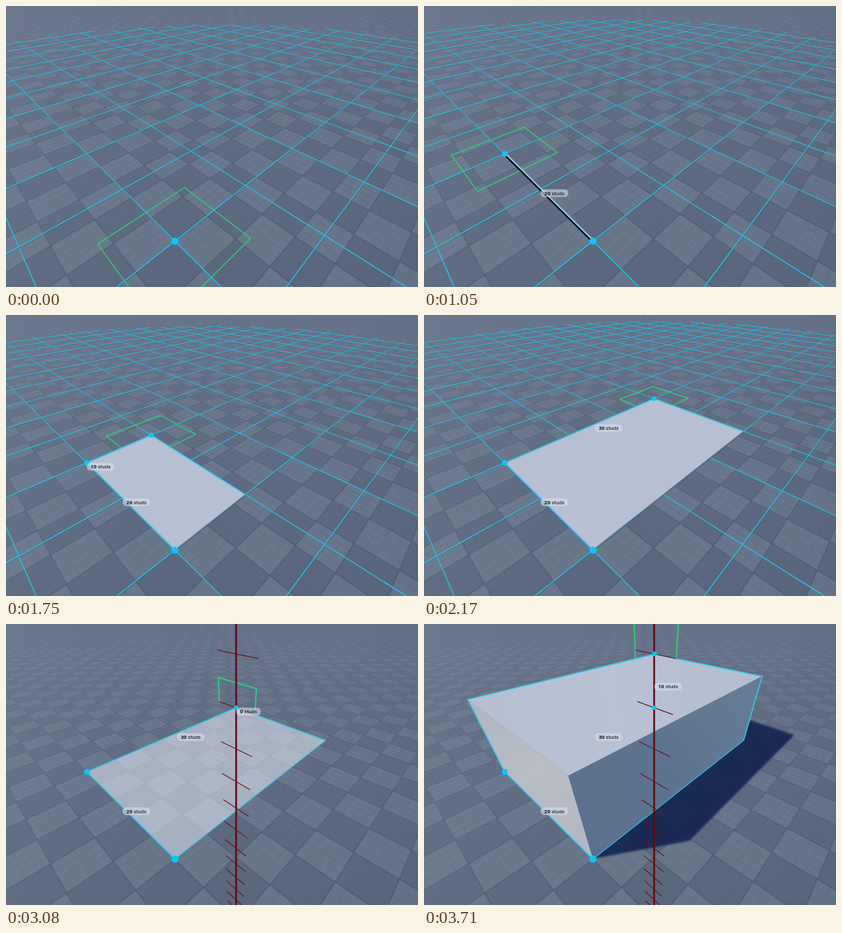
Animation, 640 px wide and 438 px high, one loop 3.92 s. Source, as an HTML page with a canvas:

```html
<!DOCTYPE html>
<html lang="en">
<head>
<meta charset="utf-8">
<title>Drawing a block on a grid</title>
<style>
  html, body { margin: 0; width: 100%; height: 100%; overflow: hidden; background: #5d6a7f; }
  canvas { display: block; width: 640px; height: 438px; }
</style>
</head>
<body>
<canvas id="stage" width="640" height="438"></canvas>
<script>
const W = 640, H = 438, LOOP = 3920;
const CYAN = '#30c2e2', EDGE = '#2fc8ee', DOT = '#0cc4fa', GREEN = '#2ccb78', PLANE = '#b7bfd3';
const GRID_RADIUS = 10.6;   // in units of 10 studs
const TILE = 0.4;

// Cursor cell over time: [ms, u, v]
const CURSOR = [[0, 0, 0], [280, 1, 0], [490, 2, 0], [1330, 2, 1], [1820, 2, 2], [2030, 2, 3]];
const EXTRUDE = 2590, ZERO_LABEL = 2800, RISE = 3220;

const ctx = document.getElementById('stage').getContext('2d');

// Perspective of a point: u and v lie on the ground, w is height
function project(u, v, w = 0) {
  const depth = 1 + 0.23156 * u + 0.25286 * v - 0.295 * w;
  return [
    (262 - 39.555 * u + 203.42 * v - 104.3 * w) / depth + 0.5,
    (366 - 14.741 * u - 15.899 * v - 199.6 * w) / depth + 0.5,
    depth
  ];
}

function trace(c, points, close) {
  c.beginPath();
  points.forEach(([x, y]) => c.lineTo(x, y));
  if (close) c.closePath();
}

function fill(c, points, style) {
  trace(c, points, true);
  c.fillStyle = style;
  c.fill();
}

function stroke(c, points, style, width, close = false) {
  trace(c, points, close);
  c.strokeStyle = style;
  c.lineWidth = width;
  c.stroke();
}

function shift([x, y], dx, dy) {
  return [x + dx, y + dy];
}

function gradient(c, x0, y0, x1, y1, ...stops) {
  const g = c.createLinearGradient(x0, y0, x1, y1);
  stops.forEach((color, i) => g.addColorStop(i / (stops.length - 1), color));
  return g;
}

function drawTile(c, i, j) {
  const u = i * TILE, v = j * TILE;
  const [x, y, depth] = project(u + TILE / 2, v + TILE / 2);
  if (depth < 0.6 || depth > 7.4 || x < -120 || x > W + 120 || y > H + 100) return;
  const fade = 1 / (1 + (depth / 4.5) ** 2);
  const corners = [project(u, v), project(u + TILE, v),
                   project(u + TILE, v + TILE), project(u, v + TILE)];
  const light = (i + j) & 1;
  if (light) fill(c, corners, `rgba(125,139,158,${0.4 * fade})`);
  stroke(c, corners, `rgba(62,75,96,${0.2 * fade})`, 2 / depth, true);
  if (depth > 3.2) return;
  const ink = `rgba(58,71,92,${(light ? 0.3 : 0.16) * (1 - depth / 3.4)})`;
  for (let k = 1; k < 4; k++) {
    const s = k * TILE / 4;
    stroke(c, [project(u + s, v), project(u + s, v + TILE)], ink, 0.9);
    stroke(c, [project(u, v + s), project(u + TILE, v + s)], ink, 0.9);
  }
}

function makeGround() {
  const canvas = document.createElement('canvas');
  canvas.width = W;
  canvas.height = H;
  const c = canvas.getContext('2d');
  c.fillStyle = gradient(c, 0, 0, 0, H, '#69758b', '#616e83', '#5d6a7f', '#5a677c');
  c.fillRect(0, 0, W, H);
  for (let i = -8; i < 58; i++) for (let j = -6; j < 54; j++) drawTile(c, i, j);
  c.fillStyle = gradient(c, 0, 0, W, 0, 'rgba(150,160,178,.12)', 'rgba(110,125,148,0)', 'rgba(50,65,92,.06)');
  c.fillRect(0, 0, W, H);
  return canvas;
}

const ground = makeGround();

// A straight ground line that gets thinner with distance, with a dark lower edge
function gridLine(from, to) {
  const steps = 24;
  const at = k => project(from[0] + (to[0] - from[0]) * k / steps,
                          from[1] + (to[1] - from[1]) * k / steps);
  for (let k = 0; k < steps; k++) {
    const a = at(k), b = at(k + 1);
    if (Math.min(a[2], b[2]) < 0.4) continue;
    const width = Math.max(1, 1.7 / Math.sqrt((a[2] + b[2]) / 2));
    const drop = width / 2;
    stroke(ctx, [shift(a, drop, drop), shift(b, drop, drop)], 'rgba(18,92,122,.45)', width);
    stroke(ctx, [a, b], CYAN, width);
  }
}

function drawGrid(u, v) {
  ctx.globalAlpha = 0.92;
  for (let k = -10; k <= 10; k++) {
    const reach = Math.sqrt(GRID_RADIUS ** 2 - k * k);
    gridLine([u + k, v - reach], [u + k, v + reach]);
    gridLine([u - reach, v + k], [u + reach, v + k]);
  }
  ctx.globalAlpha = 1;
}

function dot(u, v, w = 0) {
  const [x, y, depth] = project(u, v, w);
  ctx.beginPath();
  ctx.arc(x, y, 5.6 / depth ** 0.6, 0, Math.PI * 2);
  ctx.fillStyle = DOT;
  ctx.fill();
}

function label(studs, u, v, w = 0) {
  const [x, y] = project(u, v, w);
  const number = String(studs), bold = '700 8px Roboto, sans-serif', plain = '8px Roboto, sans-serif';
  ctx.font = bold;
  const numberWidth = ctx.measureText(number).width;
  ctx.font = plain;
  const width = numberWidth + ctx.measureText(' studs').width + 12;
  ctx.beginPath();
  ctx.roundRect(x, y, width, 12, 5.5);
  ctx.fillStyle = 'rgba(214,220,232,.6)';
  ctx.fill();
  ctx.fillStyle = '#0b0d12';
  ctx.textBaseline = 'middle';
  ctx.fillText(' studs', x + 6 + numberWidth, y + 6.5);
  ctx.font = bold;
  ctx.fillText(number, x + 6, y + 6.5);
}

function drawSketch(t) {
  const [, u, v] = CURSOR.findLast(step => t >= step[0]);
  const square = [[.5, .5], [.5, -.5], [-.5, -.5], [-.5, .5]].map(([a, b]) => project(u + a, v + b));
  const a = project(0, 0), b = project(u, 0), c = project(u, v), d = project(0, v);

  drawGrid(u, v);
  stroke(ctx, square, GREEN, 1.6, true);
  if (v) {
    fill(ctx, [a, b, c, d], PLANE);
    stroke(ctx, [a, d], '#5b6475', 1.2);
    stroke(ctx, [a, b, c, d], EDGE, 1.8);
  } else if (u) {
    stroke(ctx, [shift(a, -.9, .9), shift(b, -.9, .9)], '#05070b', 2.6);
    stroke(ctx, [shift(a, .9, -.9), shift(b, .9, -.9)], '#8fc6e0', 2.2);
  }
  dot(0, 0);
  if (u) {
    dot(u, 0);
    label(u * 10, u / 2, 0);
  }
  if (v) {
    dot(u, v);
    label(v * 10, u, v === 1 ? 0 : v / 2);
  }
}

function drawRuler() {
  const [x] = project(2, 3);
  stroke(ctx, [[x, 0], [x, H]], '#2b0a12', 2.6);
  stroke(ctx, [[x + .3, 0], [x + .3, H]], '#781318', 1.4);
  for (let w = 1; w > -13; w--) {
    stroke(ctx, [project(2.5, 3, w), project(1.5, 3, w)], '#6b1118', 1.2);
  }
}

function drawShadow(t) {
  const strength = Math.min(1, (t - RISE + 70) / 280);
  ctx.save();
  ctx.filter = 'blur(1.5px)';
  fill(ctx, [[262, 366], [412, 338], [575, 173], [507, 150], [470, 185]], `rgba(18,36,78,${0.9 * strength})`);
  ctx.restore();
}

function drawExtrusion(t) {
  const h = t >= RISE ? 1 : 0;
  const base = [[0, 0], [2, 0], [2, 3], [0, 3]];
  const [a, b, c, d] = base.map(([u, v]) => project(u, v));
  const top = base.map(([u, v]) => project(u, v, h));
  const [ta, tb, tc, td] = top;

  if (h) drawShadow(t);
  const low = Math.max(0, h - .5);
  stroke(ctx, [project(2.5, 3, low), project(2.5, 3, h + .5),
               project(1.5, 3, h + .5), project(1.5, 3, low)], GREEN, 2.2);

  if (h) {
    fill(ctx, top, gradient(ctx, 70, 120, 520, 90, '#b6bed2', '#b9c1d5', '#b4bccf'));
    fill(ctx, [a, b, tb, ta], gradient(ctx, 80, 130, 250, 340, '#aeb6c3', '#b9bdc4', '#b2b8c3'));
    fill(ctx, [a, ta, td, d], gradient(ctx, 240, 300, 510, 130, '#5b718d', '#5d7490', '#667c95'));
    stroke(ctx, [b, tb, tc, td, d], EDGE, 1.7);
  } else {
    fill(ctx, top, t >= ZERO_LABEL ? 'rgba(236,242,255,.52)' : PLANE);
    stroke(ctx, [b, c, d], EDGE, 1.7);
  }
  stroke(ctx, [d, a], '#2bbce2', 1.3);
  stroke(ctx, [a, b], EDGE, 1.8);

  drawRuler();
  dot(0, 0);
  dot(2, 0);
  dot(2, 3);
  if (h) dot(2, 3, h);
  label(20, 1, 0);
  label(30, 2, 1.5);
  if (t >= ZERO_LABEL) label(h * 10, 2, 3, h / 2);
}

function draw(now) {
  const t = now % LOOP;
  ctx.drawImage(ground, 0, 0);
  ctx.lineJoin = 'round';
  if (t < EXTRUDE) drawSketch(t);
  else drawExtrusion(t);
}

const start = performance.now();
function tick() {
  draw(performance.now() - start);
  requestAnimationFrame(tick);
}
tick();
</script>
</body>
</html>
```
